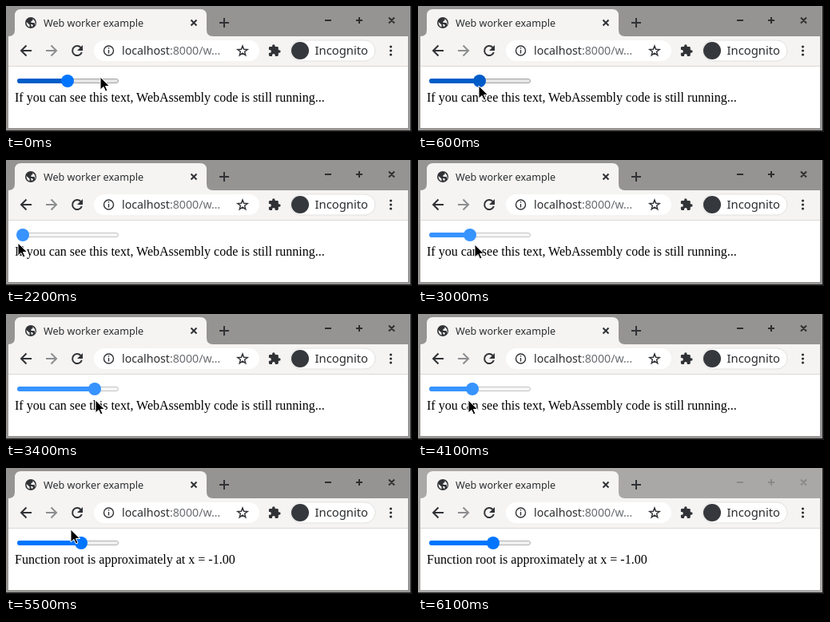
An HTML page that plays this animation: 508x158 px, repeating every 6.2 s.

```html
<!DOCTYPE html>
<html lang="en">
<head>
<meta charset="utf-8">
<title>Web worker example</title>
<style>
  html, body { margin: 0; width: 100%; height: 100%; overflow: hidden; background: #1c1b1c; }
  svg { display: block; width: 508px; height: 158px; }
  text { font-family: "Noto Sans", sans-serif; fill: #2b2d30; white-space: pre; }
  #message { font: 16px "Liberation Serif", serif; fill: #000; }
  .line { fill: none; stroke: #303236; stroke-width: 2; }
  .thin { stroke-width: 1.4; }
  .dim { stroke: #8d8e90; }
</style>
</head>
<body>
<svg viewBox="0 0 508 158">
  <rect id="frame" width="506" height="156"/>

  <!-- tab strip -->
  <path fill="#f5f4f2" d="M3 38q8 0 8-8V12q0-8 8-8H243q8 0 8 8V30q0 8 8 8H503V76H3z"/>
  <circle cx="31" cy="21" r="7" fill="#303236"/>
  <path fill="#f5f4f2" d="M25.500 20l4 3.500v3q-4-1.500-4-6.500M30 16h3.500v2l-2 1v2h4l1 3q1-5-3-8zM31 23h2l1 2-2 1z"/>
  <text x="47" y="25.500" font-size="12.600">Web worker example</text>
  <path class="line" d="M231.500 17.500l7 7m0-7l-7 7"/>
  <path class="line" d="M267 21h12m-6-6v12"/>
  <path id="controls" fill="none" stroke-width="2" d="M399 18h8M438 18h8m-4-4v8M479 14.500l7 7m0-7l-7 7"/>

  <!-- toolbar -->
  <path class="line" d="M32 56H19m6.500-6.500L19 56l6.500 6.500"/>
  <path class="line dim" d="M50 56H63m-6.500-6.500L63 56l-6.500 6.500"/>
  <path class="line" d="M93.500 52a6 6 0 1 0 1.300 6"/>
  <path fill="#303236" d="M96 49v7h-7z"/>
  <rect x="110" y="43" width="207" height="26" rx="13" fill="#fff"/>
  <circle class="line thin" cx="128.500" cy="56" r="6"/>
  <path class="line thin" d="M128.500 55v4.500m0-7.500v1.600"/>
  <text x="145" y="61" font-size="14.200">localhost<tspan fill="#6b6e72">:8000/w…</tspan></text>
  <path class="line thin" transform="translate(296 56.500)"
    d="M0-6.500L1.600-2.200 6.200-2 2.600.8 3.800 5.300 0 2.700-3.800 5.300-2.600.8-6.200-2-1.600-2.200z"/>
  <path fill="#303236" transform="translate(327.500 47.500) scale(.7)"
    d="M20.500 11H19V7c0-1.100-.9-2-2-2h-4V3.500a2.500 2.500 0 0 0-5 0V5H4c-1.100 0-2 .9-2 2v3.800h1.500a2.700 2.700 0 0 1 0 5.400H2V20c0 1.100.9 2 2 2h3.800v-1.500a2.700 2.700 0 0 1 5.400 0V22H17c1.100 0 2-.9 2-2v-4h1.500a2.500 2.500 0 0 0 0-5z"/>
  <rect x="356" y="43" width="106" height="26" rx="13" fill="#fff" stroke="#e2e1df"/>
  <circle cx="368" cy="56" r="11" fill="#35383c"/>
  <text x="386.500" y="61" font-size="14.800" font-weight="500">Incognito</text>
  <path class="line" style="stroke-width:3.200" stroke-linecap="round" d="M481.500 51h.01m-.01 5h.01m-.01 5h.01"/>

  <!-- page -->
  <path fill="#dcdad8" d="M3 75h500v1H3z"/>
  <rect x="3" y="76" width="500" height="77" fill="#fff"/>
  <rect id="track" x="14.500" y="91.500" width="126" height="5" rx="2.500"/>
  <rect id="filled" x="14" y="91" height="6" rx="3"/>
  <circle id="thumb" cy="94" r="8"/>
  <text id="message" x="11" y="120"></text>
  <path id="cursor" stroke="#fff" d="M0 0V16L4 12.500 6.500 18 9 17 6.500 11.500H11.500z"/>
</svg>
<script>
// All times in ms.
const LOOP = 6200, STEP = 100, LAG = 40;
const PRESS = 1000, DONE = 4700, RELEASE = 5200, EXIT = 5900, BLUR = 6100;
const REST = 77, MIN = 21, MAX = 134;

const origin = { x: 118, y: 89 };
const moves = [
  { from: 0, to: 600, x: 76, y: 100 },
  { from: 600, to: 800, x: 77, y: 93 },
  { from: 900, to: 1450, x: 128, y: 101 },
  { from: 1500, to: 2200, x: 15, y: 104 },
  { from: 2450, to: 3450, x: 113, y: 108 },
  { from: 3600, to: 4300, x: 51, y: 108 },
  { from: 4500, to: 5000, x: 94, y: 108 },
  { from: 5280, to: 6000, x: 34, y: -33 }
];

const slider = {
  normal: { accent: "#0075ff", fill: "#efefef", border: "#b2b2b2" },
  hover: { accent: "#005cc8", fill: "#e5e5e5", border: "#a2a2a2" },
  active: { accent: "#3793ff", fill: "#f5f5f5", border: "#c4c4c4" }
};

const clamp = (v, low, high) => Math.min(high, Math.max(low, v));
const smooth = k => k * k * (3 - 2 * k);

const set = (id, attrs) => {
  const element = document.getElementById(id);
  for (const name in attrs) element.setAttribute(name, attrs[name]);
};

function pointerAt(t) {
  let { x, y } = origin;
  for (const move of moves) {
    const k = smooth(clamp((t - move.from) / (move.to - move.from), 0, 1));
    x += (move.x - x) * k;
    y += (move.y - y) * k;
  }
  return { x: Math.round(x), y: Math.round(y) };
}

// The dragged thumb trails the pointer slightly.
function thumbAt(t) {
  return t < PRESS ? REST : clamp(pointerAt(Math.min(t, RELEASE) - LAG).x, MIN, MAX);
}

function draw(now) {
  const t = Math.floor(now % LOOP / STEP) * STEP;
  const { x, y } = pointerAt(t);
  const thumb = thumbAt(t);
  const pressed = t >= PRESS && t < RELEASE;
  const over = y >= 86 && y < 102;
  const state = pressed ? "active" : over ? "hover" : "normal";
  const thumbState = state === "hover" && Math.abs(x - thumb) > 8 ? "normal" : state;
  const focused = t < BLUR;

  set("frame", { fill: focused ? "#969492" : "#aaa8a6" });
  set("controls", { stroke: focused ? "#2e2e2e" : "#8b8987" });
  set("track", { fill: slider[state].fill, stroke: slider[state].border });
  set("filled", { width: thumb - 14, fill: slider[state].accent });
  set("thumb", { cx: thumb, fill: slider[thumbState].accent });
  set("cursor", {
    transform: `translate(${x} ${y})`,
    visibility: t < EXIT ? "visible" : "hidden"
  });
  document.getElementById("message").textContent = t < DONE
    ? "If you can see this text, WebAssembly code is still running..."
    : "Function root is approximately at x = -1.00";
}

const start = performance.now();
function tick() {
  draw(performance.now() - start);
  requestAnimationFrame(tick);
}
tick();
</script>
</body>
</html>
```
